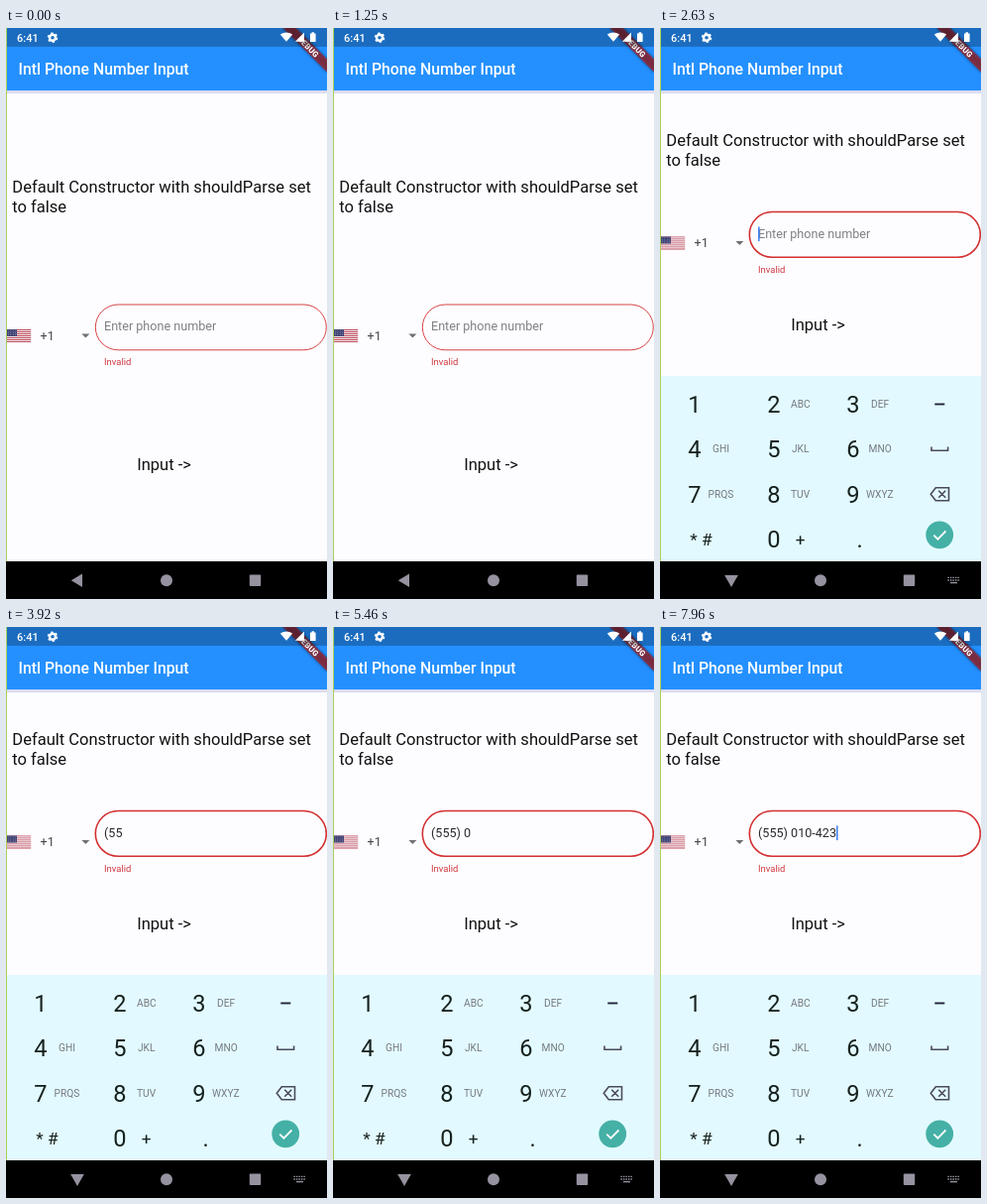
An HTML page for the animation above (8 s loop, 324 by 576 pixels).

```html
<!DOCTYPE html>
<html lang="en">
<head>
<meta charset="utf-8">
<title>Phone input demo</title>
<style>
  html, body { margin: 0; width: 100%; height: 100%; overflow: hidden; background: #000; }
  svg { display: block; width: 100%; height: 100%; }
  text { font-family: Roboto, sans-serif; font-size: 12.6px; white-space: pre; }
  .heading { font-size: 16.55px; fill: #111; }
  .digit { font-size: 23.6px; fill: #16211e; text-anchor: middle; }
  .symbol { font-size: 17.3px; fill: #16211e; text-anchor: middle; }
  .letters { font-size: 10.2px; fill: #75787f; }
</style>
</head>
<body>
<svg viewBox="0 0 324 576">
  <defs>
    <clipPath id="aboveNav"><rect width="324" height="538"/></clipPath>
    <filter id="blur" x="-20%" y="-60%" width="140%" height="220%"><feGaussianBlur stdDeviation="1.8"/></filter>
  </defs>

  <rect width="324" height="538" fill="#fdfcff"/>
  <rect y="63" width="324" height="3" fill="#dcdcf0"/>
  <rect width="324" height="63" fill="#2490ff"/>
  <text x="12.6" y="47.4" fill="#fff" style="font-size:15.77px;font-weight:500">Intl Phone Number Input</text>

  <g id="titleRow" class="heading">
    <text class="heading" x="6.3" y="166">Default Constructor with shouldParse set</text>
    <text class="heading" x="6.3" y="185.6">to false</text>
  </g>
  <g id="fieldRow">
    <g id="flag"></g>
    <text x="34.6" y="314.8" fill="#444">+1</text>
    <path d="M76.4 308.5h8l-4 4z" fill="#6f6f74"/>
    <rect id="border" x="90.3" y="279" width="233" height="45.8" rx="22.9" fill="none" stroke="#d32f2f"/>
    <text id="hint" x="99" y="305.3" fill="#808084">Enter phone number</text>
    <text id="value" x="99" y="305.3" fill="#2b2b2e"></text>
    <rect id="caret" y="294" width="1.6" height="14.6" fill="#4285f4"/>
    <text x="99" y="340.2" fill="#d0393f" style="font-size:9.46px">Invalid</text>
  </g>
  <text id="inputRow" class="heading" x="132.2" y="445.6">Input -&gt;</text>

  <g transform="translate(324) rotate(45)">
    <rect x="-31.5" y="22.06" width="63" height="9.46" opacity=".5" filter="url(#blur)"/>
    <rect x="-31.5" y="22.06" width="63" height="9.46" fill="#b71c1c" fill-opacity=".63"/>
    <text y="29.7" fill="#fff" text-anchor="middle" style="font-size:8.04px;font-weight:900">DEBUG</text>
  </g>

  <rect width="324" height="18.9" fill-opacity=".25"/>
  <g fill="#fff">
    <text x="11" y="13.9" style="font-size:11px;font-weight:500">6:41</text>
    <circle cx="47" cy="9.7" r="3" fill="none" stroke="#fff" stroke-width="2.4"/>
    <circle cx="47" cy="9.7" r="4.5" fill="none" stroke="#fff" stroke-width="1.5" stroke-dasharray="2.4 2.312"/>
    <path d="M283 13.8L276.8 6.6Q283 2.6 289.2 6.6Z"/>
    <path d="M301 4.6v9.2h-9.2z"/>
    <path d="M307 5.4h1.6v-1.2h2.4v1.2h1.6v8.6h-5.6z"/>
  </g>

  <g clip-path="url(#aboveNav)">
    <g id="keyboard">
      <rect y="351" width="324" height="187" fill="#e2faff"/>
      <g id="keys"></g>
      <g fill="none" stroke="#4b4a5c" stroke-width="1.6">
        <path d="M277.3 379.5h10" stroke="#222236" stroke-width="1.9"/>
        <path d="M274 422.5v3.8h16.6v-3.8"/>
        <path d="M278.3 463.8h13.2v13h-13.2l-5-6.5zM281.2 466.8l7 7m0-7l-7 7"/>
      </g>
      <circle cx="282.2" cy="511.3" r="13.9" fill="#45b0a6"/>
      <path d="M276.3 511.6l4.1 4.1 8-8.2" fill="none" stroke="#fff" stroke-width="1.8"/>
    </g>
  </g>
  <path d="M.5 0V538" stroke="#a9d25a"/>

  <rect y="538" width="324" height="38"/>
  <g fill="#96929f">
    <path id="back" d="M65.8 557.3l11.2-6.7v13.4z"/>
    <path id="dismiss" d="M65.2 552h13.6l-6.8 12z"/>
    <circle cx="162" cy="557.3" r="6"/>
    <rect x="245.8" y="551.6" width="11.4" height="11.4" rx="1"/>
    <g id="switcher" fill="none" stroke="#96929f" stroke-width="1.4" stroke-dasharray="1.5 1">
      <path d="M290.4 554.4h12M290.4 557h12"/>
      <path d="M293 559.6h7" stroke-dasharray="none"/>
    </g>
  </g>
</svg>

<script>
const LOOP = 8000;
const FOCUS = 1380, RESIZE = 1440, SLIDE = 210;
const KEYBOARD_HEIGHT = 187;
const DIGITS = '555010423';
const KEY_TIMES = [2900, 3380, 4060, 4720, 5500, 5900, 6560, 7150, 7700];

const el = id => document.getElementById(id);
const show = (id, on) => el(id).setAttribute('visibility', on ? 'visible' : 'hidden');
const moveY = (id, y) => el(id).setAttribute('transform', `translate(0 ${y})`);

function buildFlag() {
  let out = '';
  for (let i = 0; i < 13; i++)
    out += `<rect x="1" y="${304 + i}" width="24.2" height="1" fill="${i % 2 ? '#f4eef2' : '#c04a5c'}"/>`;
  out += '<rect x="1" y="304" width="10" height="7" fill="#414476"/>';
  for (let i = 0; i < 12; i++)
    out += `<circle cx="${2.4 + i % 4 * 2.4}" cy="${305.3 + (i >> 2) * 2.1}" r=".4" fill="#dcdcec"/>`;
  el('flag').innerHTML = out;
}

function buildKeys() {
  const letters = [['', 0], ['ABC', 132], ['DEF', 213], ['GHI', 53], ['JKL', 133], ['MNO', 210.5],
                   ['PRQS', 48.6], ['TUV', 132], ['WXYZ', 208]];
  const text = (cls, x, y, s) => `<text class="${cls}" x="${x}" y="${y}">${s}</text>`;
  let out = '';
  letters.forEach(([label, x], i) => {
    const y = 379 + Math.floor(i / 3) * 45.6;
    out += text('digit', 35 + i % 3 * 80, y + 8.5, i + 1) + text('letters', x, y + 3.6, label);
  });
  out += text('digit', 115, 524.3, 0) + text('digit', 201.5, 524.3, '.');
  out += text('symbol', 34, 522.3, '*') + text('symbol', 47.3, 522.3, '#') + text('symbol', 141.6, 522.3, '+');
  el('keys').innerHTML = out;
}

function formatNumber(d) {
  if (d.length < 2) return d;
  if (d.length < 3) return '(' + d;
  return `(${d.slice(0, 3)})` + (d.length > 3 ? ' ' + d.slice(3, 6) : '') + (d.length > 6 ? '-' + d.slice(6) : '');
}

function render(t) {
  const focused = t >= FOCUS, open = t >= RESIZE;
  const typed = KEY_TIMES.filter(k => k <= t).length;

  // Free height is shared by four equal gaps around the three rows.
  const gap = open ? KEYBOARD_HEIGHT / 4 : 0;
  moveY('titleRow', -gap);
  moveY('fieldRow', -2 * gap);
  moveY('inputRow', -3 * gap);

  const p = Math.min(1, Math.max(0, (t - RESIZE) / SLIDE));
  moveY('keyboard', KEYBOARD_HEIGHT * (1 - p) ** 3);
  show('keyboard', open);
  show('back', !open);
  show('dismiss', open);
  show('switcher', open);

  el('border').setAttribute('stroke-width', focused ? 1.6 : 0.9);
  el('value').textContent = formatNumber(DIGITS.slice(0, typed));
  show('hint', !typed);

  // The caret restarts its blink with every key.
  const blinkStart = typed ? KEY_TIMES[typed - 1] : FOCUS;
  show('caret', focused && (t - blinkStart) % 1000 < 500);
  el('caret').setAttribute('x', 99 + (typed ? el('value').getComputedTextLength() : 0));
}

buildFlag();
buildKeys();
const start = performance.now();
function tick() {
  render((performance.now() - start) % LOOP);
  requestAnimationFrame(tick);
}
tick();
</script>
</body>
</html>
```
